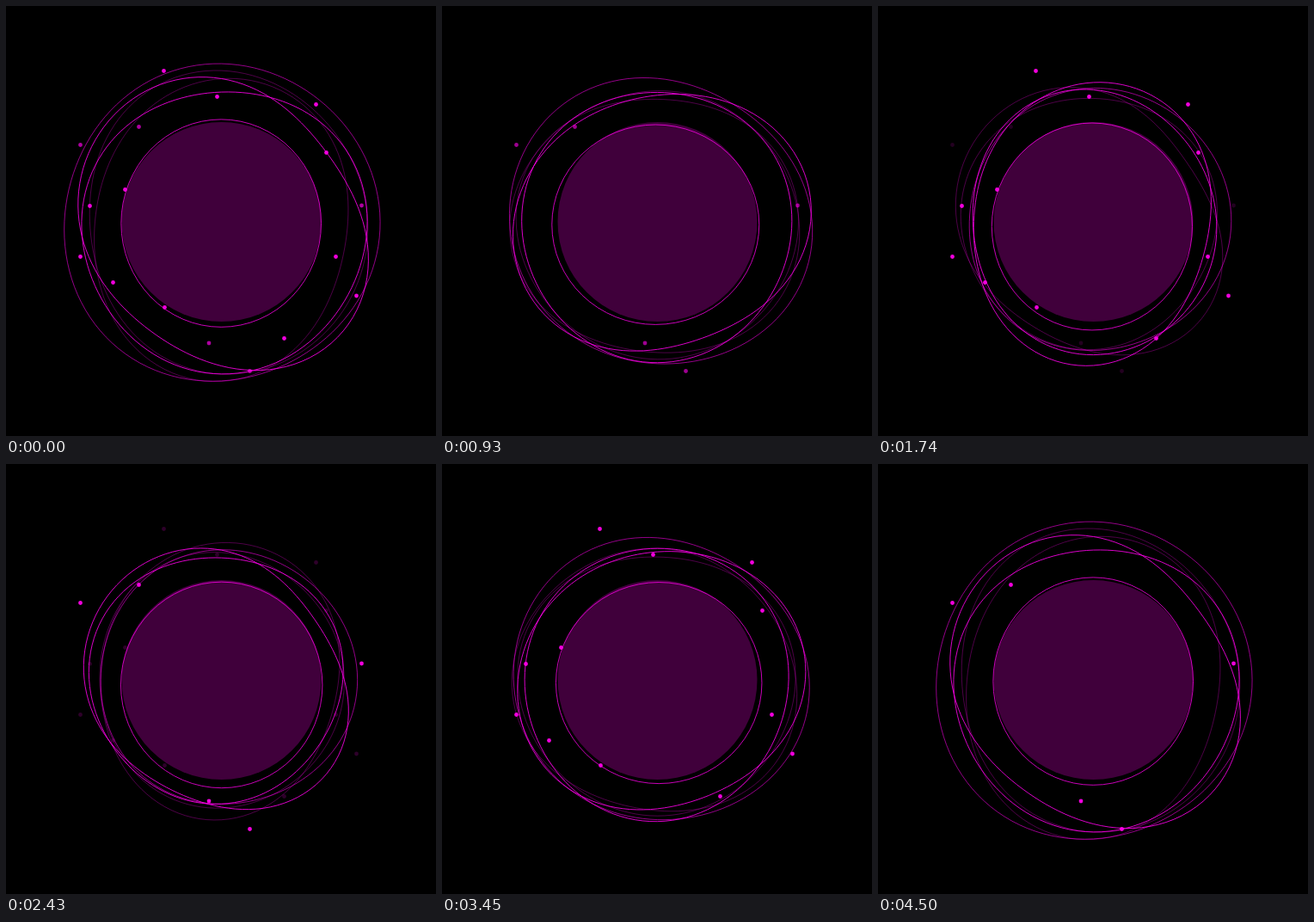
These frames come from a looping animation (500 px wide and 500 px high, 4.53 s). An HTML page with a canvas:

```html
<!DOCTYPE html>
<html lang="en">
<head>
<meta charset="utf-8">
<title>Orbiting lines</title>
<style>
  html, body { margin: 0; width: 100%; height: 100%; overflow: hidden; background: #000; }
  canvas { display: block; width: 500px; height: 500px; }
</style>
</head>
<body>
<canvas id="stage" width="500" height="500"></canvas>
<script>
const ctx = document.getElementById('stage').getContext('2d');
const LOOP = 4530, STEP = 30, CYCLE = 4500, MID = 250, TAU = Math.PI * 2;

// Each blob breathes in size, drifts off centre, and swings between oval shapes.
// Vectors are the cosine and sine parts of one harmonic around the outline.
// side: which of the two alternating groups glows; 0 keeps a steady middle tone.
const BLOBS = [
  { side: 0, size: 166, breath: 18, shift: [3, 0], drift: [-4, 2], oval: [2, 1.5], swing: [3, 4], tri: [2, 1] },
  { side: 1, size: 158, breath: 8, shift: [-2.5, 3], drift: [4, 1], oval: [3, 10], swing: [5, -9], tri: [-2, 3] },
  { side: 1, size: 155, breath: 10, shift: [-1.5, 4.5], drift: [5, 6], oval: [3.5, 0], swing: [3, 1], tri: [0, -3] },
  { side: -1, size: 155.5, breath: 6, shift: [-1, 4], drift: [1, 4], oval: [-8, -3], swing: [8, 3], tri: [0, -2] },
  { side: -1, size: 157, breath: 12, shift: [2.5, 1], drift: [4, 0], oval: [1.5, -2], swing: [11, -7], tri: [2, 0] }
];

// Two sets of dots, each blinking with its own period (in loops).
const DOT_SETS = [
  { peak: 0, period: 0.4, dots: [
    [183, 75], [360, 114], [245, 105], [372, 170], [138, 213], [97, 232], [383, 291],
    [86, 291], [124, 321], [407, 336.5], [184, 350], [323, 386]] },
  { peak: 0.1, period: 0.45, dots: [
    [154, 140], [86, 161], [413, 231.5], [235.5, 391.5], [283, 424]] }
];

const pink = a => `rgba(255,0,234,${a})`;
const wave = turns => Math.cos(TAU * turns);
const clamp = v => Math.max(0, Math.min(1, v));

function disc(x, y, r, fill) {
  ctx.beginPath();
  ctx.arc(x, y, r, 0, TAU);
  ctx.fillStyle = fill;
  ctx.fill();
}

function drawBlob(blob, slow, beat, glow) {
  const harmonic = ([x, y], a) => x * Math.cos(a) + y * Math.sin(a);
  ctx.beginPath();
  for (let d = 0; d < 360; d += 3) {
    const a = d / 360 * TAU;
    const r = blob.size + blob.breath * slow
      + harmonic(blob.shift, a) + harmonic(blob.drift, a) * slow
      + harmonic(blob.oval, 2 * a) + harmonic(blob.swing, 2 * a) * beat
      + harmonic(blob.tri, 3 * a);
    ctx.lineTo(MID + r * Math.cos(a), MID + r * Math.sin(a));
  }
  ctx.closePath();
  ctx.strokeStyle = pink(0.3 + 0.55 * clamp(0.5 + 2 * glow * blob.side));
  ctx.stroke();
}

function drawRing(u, slow, beat) {
  const x = 249.7 - 2 * Math.sin(TAU * u), y = 254.3 - 2.2 * slow;
  ctx.beginPath();
  ctx.ellipse(x, y, 118.2 + 2.3 * beat, 118.7 - 2.5 * beat, 0, 0, TAU);
  ctx.strokeStyle = pink(0.78);
  ctx.stroke();
}

function draw(t) {
  const u = t / CYCLE;
  const slow = wave(u), beat = wave(2 * (u - 0.2)), glow = wave(2 * (u - 0.06));

  ctx.setTransform(1, 0, 0, 1, 0, 0);
  ctx.fillStyle = '#000';
  ctx.fillRect(0, 0, 500, 500);
  ctx.translate(0.5, 0.5);
  ctx.lineWidth = 1;

  disc(MID, 250.5, 116, '#40003b');
  for (const blob of BLOBS) drawBlob(blob, slow, beat, glow);
  drawRing(u, slow, beat);

  for (const { peak, period, dots } of DOT_SETS) {
    const level = clamp(0.6 + 0.7 * wave((u - peak) / period));
    for (const [x, y] of dots) disc(x, y, 2.4, pink(0.95 * level));
  }
}

const start = performance.now();
function tick() {
  const t = (performance.now() - start) % LOOP;
  draw(Math.floor(t / STEP) * STEP);
  requestAnimationFrame(tick);
}
tick();
</script>
</body>
</html>
```
